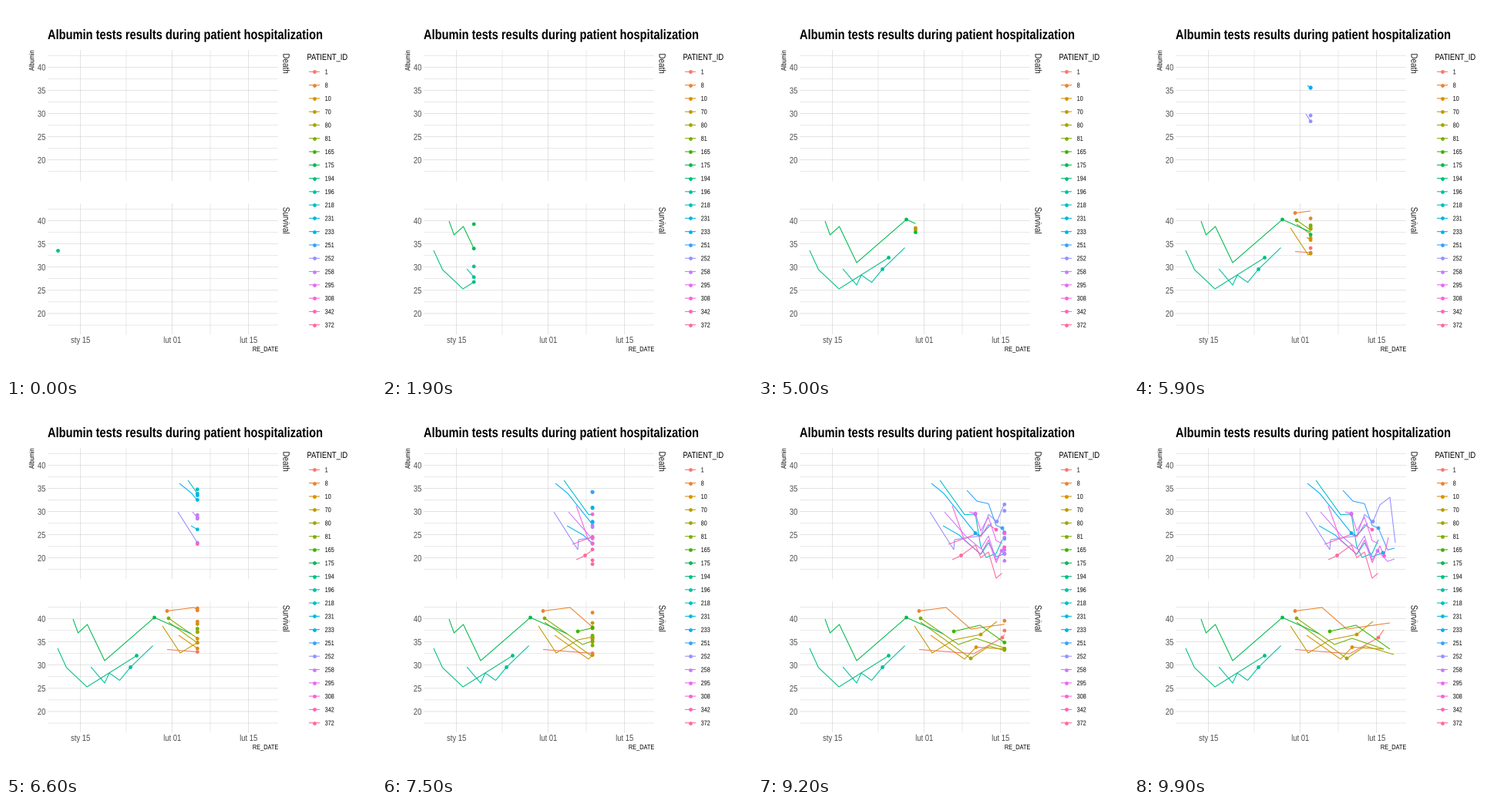
These frames come from a looping animation (480x480 px, 10 s). A matplotlib script:

```python
import numpy as np
import matplotlib.pyplot as plt
from matplotlib.animation import FuncAnimation
from matplotlib.patches import PathPatch
from matplotlib.textpath import TextPath
from matplotlib.transforms import Affine2D

SIZE, FRAMES = 480, 100
T0, T1 = 67, 339          # sweep of the reveal along x
LATE = 282                # from here on tests are taken often
NARROW = 0.82             # condensed face
DOT = 23

# patient id: (index of the lasting dot, key points of the line)
SURVIVAL = {
    1: (2, [(209, 318.5), (280, 324), (317, 303), (324, 293)]),
    8: (0, [(209, 268.5), (244, 264), (276, 292), (332, 284)]),
    10: (2, [(224, 300), (268, 331), (283, 315.5), (324, 318)]),
    70: (3, [(203, 288), (226, 323), (254, 306), (289, 299), (310, 282)]),
    80: (1, [(211, 283), (276, 330), (300, 314), (337, 325)]),
    81: (0, [(211, 278), (260, 312), (283, 304), (324, 318)]),
    165: (0, [(254, 295), (288, 287), (332, 318)]),
    175: (4, [(87, 279), (93.5, 297), (105.5, 286), (128, 333), (192.5, 277),
              (240, 298)]),
    194: (3, [(67, 317), (78.5, 342), (105, 367), (169.5, 326.5)]),
    196: (4, [(110, 341), (128, 362), (134, 349), (147.5, 358.5),
              (161.5, 341.5), (190.5, 313.5)]),
}
DEATH = {
    218: (2, [(236, 99), (268, 143.5), (282, 143), (296, 199), (317, 176)]),
    231: (2, [(240, 158), (261, 170), (323, 193)]),
    233: (2, [(225, 103), (241, 116), (282, 167.5), (303, 155)]),
    251: (2, [(271, 112), (284, 126), (317, 161), (338, 187)]),
    252: (3, [(223, 140), (254, 189), (255, 176), (310, 152.5), (332, 121),
              (339, 180)]),
    258: (2, [(242, 140), (270, 172), (316, 190.5), (338, 201)]),
    295: (1, [(274, 140), (282, 142), (317, 181)]),
    308: (2, [(252, 132), (268, 177), (324.5, 197), (330, 173)]),
    342: (2, [(247, 182), (282, 169), (309, 163)]),
    372: (1, [(252, 202), (263.5, 196.5), (282, 183), (316.5, 219.5)]),
}


def hcl(hue, c=100, l=65):
    """Polar Luv colour as clipped sRGB."""
    h = np.radians(hue)
    u = c * np.cos(h) / (13 * l) + 0.1978
    v = c * np.sin(h) / (13 * l) + 0.4683
    y = ((l + 16) / 116) ** 3
    xyz = [y * 9 * u / (4 * v), y, y * (12 - 3 * u - 20 * v) / (4 * v)]
    rgb = np.clip(np.dot([[3.2406, -1.5372, -0.4986],
                          [-0.9689, 1.8758, 0.0415],
                          [0.0557, -0.2040, 1.0570]], xyz), 0, 1)
    rgb = np.where(rgb > 0.0031, 1.055 * rgb ** (1 / 2.4) - 0.055, 12.92 * rgb)
    return tuple(np.clip(rgb, 0, 1))


fig = plt.figure(figsize=(SIZE / 72, SIZE / 72), dpi=72, facecolor="white")
ax = fig.add_axes([0, 0, 1, 1])
ax.set(xlim=(0, SIZE), ylim=(SIZE, 0))
ax.axis("off")


def stroke(xs, ys, color, lw, z=0):
    return ax.plot(xs, ys, color=color, lw=lw, zorder=z, snap=False,
                   solid_capstyle="butt", solid_joinstyle="round")[0]


def label(x, y, s, size, color="black", anchor=0.0, turn=0, weight="normal"):
    """Draw condensed text with its baseline at y; anchor 0..1 along the text."""
    path = TextPath((0, 0), s, size=size,
                    prop=dict(family="Liberation Sans", weight=weight))
    shift = -anchor * path.get_extents().x1
    move = (Affine2D().translate(shift, 0).scale(NARROW, -1)
            .rotate_deg(turn).translate(x, y))
    ax.add_patch(PathPatch(move.transform_path(path), fc=color, lw=0))


def panel(name, top):
    for x in (96.5, 156, 215.5, 265, 314.5):
        stroke([x, x], [top, top + 170], "#cccccc", 0.43 if x % 1 == 0 else 0.53)
    for i in range(11):
        y = top + 7.3 + 15.05 * i
        stroke([54, 353], [y, y], "#cccccc", 0.53 if i % 2 else 0.43)
        if i % 2:
            label(51, y + 4.1, f"{42.5 - 2.5 * i:.0f}", 11.5, "#4d4d4d", 1)
    label(359.5, top + 4.5, name, 12, "#1a1a1a", turn=90)


def zigzag(pts, rng):
    """Add frequent up-and-down visits to the late part of a line."""
    x, y = np.transpose(pts)
    more = []
    for i, t in enumerate(np.arange(LATE + 7, x[-1], 10)):
        if np.abs(x - t).min() > 5:
            swing = rng.uniform(3, 15) * (-1) ** i
            more.append((t, np.interp(t, x, y) + swing))
    return sorted(pts + more)


class Patient:
    """A line of test results, and dots that glide between pairs of them."""

    def __init__(self, pts, keep, color):
        self.x, self.y = np.transpose(pts)
        self.keep, self.color = keep, color
        rest = [p for p in pts if p != keep]
        if keep != pts[-1]:
            rest = rest[-1:] + rest[:-1]
        row = rest + [keep]
        self.pairs = [sorted(p) for p in zip(row, row[1:])]
        self.line = stroke([], [], color, 1.07, 2)

    def reveal(self, t):
        seen = self.x <= t
        xs, ys = self.x[seen], self.y[seen]
        if seen.any() and not seen.all():
            xs = np.append(xs, t)
            ys = np.append(ys, np.interp(t, self.x, self.y))
        self.line.set_data(xs, ys)

    def dots(self, t):
        out = [(t, np.interp(t, (a[0], b[0]), (a[1], b[1])))
               for a, b in self.pairs if a[0] <= t < b[0]]
        return out + [self.keep] * (self.keep[0] <= t)


panel("Death", 57)
panel("Survival", 256.2)
label(54, 43, "Albumin tests results during patient hospitalization", 17.85,
      weight="bold")
label(36.3, 84, "Albumin", 9, turn=-90)
label(353, 448, "RE_DATE", 9, anchor=1)
for x, s in ((96.5, "sty 15"), (215.5, "lut 01"), (314.5, "lut 15")):
    label(x, 437, s, 11.5, "#4d4d4d", 0.5)
label(390.5, 70, "PATIENT_ID", 11.4)

rng = np.random.default_rng(4)
patients = []
for i, (pid, (k, pts)) in enumerate({**SURVIVAL, **DEATH}.items()):
    color, y = hcl(15 + 18 * i), 85.3 + 17.28 * i
    keep = pts[k]
    if pid in DEATH:
        pts = zigzag(pts, rng)
    patients.append(Patient(pts, keep, color))
    stroke([393, 407], [y, y], color, 1.07)
    ax.scatter([400], [y], s=DOT, color=[color], lw=0, zorder=3)
    label(413.7, y + 3.1, str(pid), 8.8)
markers = ax.scatter([], [], s=DOT, lw=0, zorder=4)


def update(i):
    t = T0 + (T1 - T0) * i / (FRAMES - 1)
    spots, colors = [], []
    for p in patients:
        p.reveal(t)
        found = p.dots(t)
        spots += found
        colors += [p.color] * len(found)
    markers.set_offsets(spots)
    markers.set_facecolor(colors)
    return [markers]


anim = FuncAnimation(fig, update, frames=FRAMES, interval=100, repeat=True,
                     repeat_delay=0, blit=False)
plt.show()
```
